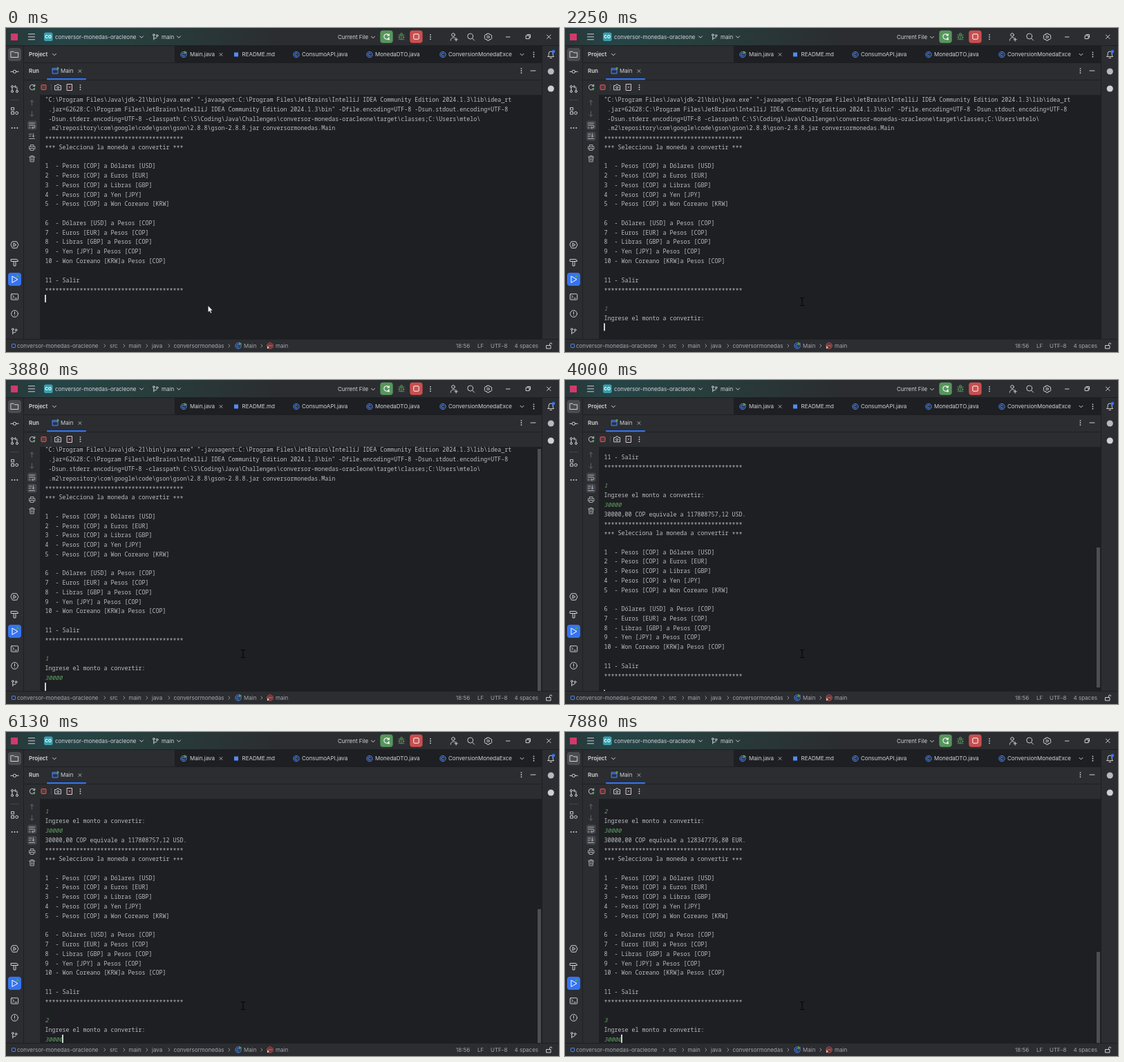
An HTML page for the animation above (8 s loop, 800x470 px).

```html
<!DOCTYPE html>
<html lang="es">
<head>
<meta charset="utf-8">
<title>Conversor de monedas</title>
<style>
  html, body { margin: 0; width: 100%; height: 100%; overflow: hidden; background: #1e1f22; }
  #stage { position: absolute; left: 0; top: 0; width: 800px; height: 470px; overflow: hidden; }
  svg { position: absolute; left: 0; top: 0; }
  svg text { font: 8px Inter, sans-serif; fill: #d3d5da; }
  svg text.bold { font-weight: 600; }
  svg .status text { fill: #a4a7af; }
  .line { fill: none; stroke: #ced0d6; stroke-width: 1; stroke-linecap: round; stroke-linejoin: round; }
  .soft { opacity: .75; }
  .dots { fill: #ced0d6; }
  #console { position: absolute; left: 50px; top: 97px; width: 725px; height: 354px; overflow: hidden; background: #1e1f22; }
  #page { position: absolute; left: 6.6px; top: 0; }
  #text { margin: 0; font: 8.333px/13.763px "Noto Sans Mono", monospace; font-variant-ligatures: none; color: #bcbec4; white-space: pre; }
  #text i { color: #62a566; }
  #text i.dim { color: #6f7d6c; }
  #text b { font-weight: 400; position: relative; top: 1.5px; }
  #caret { position: absolute; left: -.3px; top: .8px; width: 1.3px; height: 11.5px; background: #ced0d6; }
  #thumb { position: absolute; right: 1px; width: 5px; background: #4d4e51; }
</style>
</head>
<body>
<div id="stage">
<svg width="800" height="470" viewBox="0 0 800 470">
  <defs>
    <linearGradient id="glow">
      <stop offset="0" stop-color="#293638"/>
      <stop offset=".16" stop-color="#264447"/>
      <stop offset=".42" stop-color="#27403f"/>
      <stop offset="1" stop-color="#2b2d30"/>
    </linearGradient>
    <path id="down" class="line" d="M-2.5-1.2 0 1.3 2.5-1.2"/>
    <path id="right" class="line" stroke-opacity=".6" d="M-1.2-2.2 1 0-1.2 2.2"/>
    <path id="cross" class="line soft" d="M-2-2 2 2M2-2-2 2"/>
    <g id="dots" class="dots"><circle cy="-3.2" r=".9"/><circle r=".9"/><circle cy="3.2" r=".9"/></g>
    <g id="class">
      <circle r="4.2" fill="#25324d" stroke="#548af7" stroke-width=".9"/>
      <path d="M1.5-1.3A2 2 0 1 0 1.5 1.3" fill="none" stroke="#548af7"/>
    </g>
    <g id="branch" class="line">
      <circle cx="-2.2" cy="-3" r="1.3"/><circle cx="2.6" cy="-2" r="1.3"/>
      <path d="M-2.2-1.6V4M-2.2 2C1 2 2.6 1.5 2.6-.6"/>
    </g>
    <path id="rerun" fill="none" stroke-width="1.1" stroke-linecap="round" d="M3.4-1.6A3.7 3.7 0 1 0 3.6 1M3.7-4V-1.5H1.2"/>
  </defs>

  <!-- panels -->
  <path fill="#2b2d30" d="M0 0H800V25H0ZM0 26H25V451H0ZM26 26H244V50H26ZM26 51H775V97H26ZM26 97H49V451H26ZM776 26H800V451H776ZM0 452H800V470H0Z"/>
  <rect width="400" height="25" fill="url(#glow)"/>

  <!-- title bar -->
  <rect x="7" y="8" width="10" height="10" fill="#d13a6b"/>
  <path class="line" d="M32.5 8.8H41.5M32.5 12.8H41.5M32.5 16.8H41.5"/>
  <rect x="55" y="6.5" width="12.5" height="12.5" rx="2.5" fill="#3a9fae"/>
  <text x="61.2" y="15.3" text-anchor="middle" style="font-size:6.5px;font-weight:700;fill:#fff">CO</text>
  <text x="71" y="16">conversor-monedas-oracleone</text>
  <use href="#down" x="196" y="13"/>
  <use href="#branch" x="216" y="13"/>
  <text x="225" y="16">main</text>
  <use href="#down" x="250" y="13"/>
  <text x="480" y="16">Current File</text>
  <use href="#down" x="531" y="13.5"/>
  <rect x="541.3" y="3.4" width="18.4" height="18.4" rx="4" fill="#57965c"/>
  <use href="#rerun" x="550.5" y="12.5" stroke="#fff"/>
  <circle cx="553.5" cy="16" r="1.5" fill="#fff"/>
  <g class="line" style="stroke:#57965c">
    <rect x="569.4" y="9.8" width="5.2" height="7.2" rx="2.6"/>
    <path d="M570 9.5A2 2 0 0 1 574 9.5M572 11V16M567.8 10 569.4 11.3M576.2 10 574.6 11.3M567.3 13.4H569.4M574.6 13.4H576.7M567.8 17 569.6 15.6M576.2 17 574.4 15.6"/>
  </g>
  <rect x="584.2" y="3.4" width="18.4" height="18.4" rx="4" fill="#c94f4f"/>
  <rect x="589.8" y="8.8" width="7.4" height="7.4" rx="1" fill="none" stroke="#fff"/>
  <use href="#dots" x="614" y="13"/>
  <g class="line">
    <circle cx="647" cy="10" r="2.3"/><path d="M643.3 18C643.3 13 650 13 650.3 15M651.2 14.5V19M649 16.8H653.4"/>
    <circle cx="671.7" cy="12" r="3.9"/><path d="M674.5 15 677.5 18"/>
    <path d="M696 8.2H699L699.8 9.8 701.6 9.6 703 12 702 13 703 14.4 701.6 16.6 699.8 16.2 699 18H696L695.2 16.2 693.4 16.6 692 14.4 693 13 692 12 693.4 9.6 695.2 9.8Z"/><circle cx="697.5" cy="13" r="1.6"/>
    <path d="M723.5 13H729M754 10V9.5H758.5V14H757.5"/><rect x="752.5" y="11" width="4.6" height="4.6"/>
    <path d="M782.5 10 788 15.5M788 10 782.5 15.5"/>
  </g>

  <!-- project header and editor tabs -->
  <text class="bold" x="33" y="41">Project</text>
  <use href="#down" x="70" y="38.5"/>
  <use href="#class" x="257" y="38.5"/>
  <path fill="#57965c" d="M258 33 262.5 35.5 258 38Z"/>
  <text x="266" y="41">Main.java</text>
  <use href="#cross" x="311" y="38.5"/>
  <rect x="330" y="35.5" width="6" height="6" fill="#548af7"/>
  <text x="341.5" y="41">README.md</text>
  <use href="#class" x="420" y="38.5"/><text x="428" y="41">ConsumoAPI.java</text>
  <use href="#class" x="526" y="38.5"/><text x="534" y="41">MonedaDTO.java</text>
  <use href="#class" x="632" y="38.5"/><text x="640" y="41">ConversionMonedaExce</text>
  <use href="#down" x="746.5" y="38.5"/>
  <use href="#dots" x="763.5" y="38.5"/>

  <!-- run header -->
  <text class="bold" x="33" y="65">Run</text>
  <path class="line" style="stroke:#548af7;fill:#25324d" d="M67.5 58.5H75V66H67.5ZM67.5 60.5H75"/>
  <circle cx="75" cy="58.5" r="1.7" fill="#57965c"/>
  <text x="79" y="65">Main</text>
  <use href="#cross" x="107" y="62.5"/>
  <rect x="26" y="75" width="749" height="1" fill="#1e1f22"/>
  <rect x="59" y="73" width="57" height="2.2" rx="1" fill="#3574f0"/>
  <use href="#dots" x="745.5" y="62"/>
  <path class="line" d="M759 62H766"/>
  <use href="#rerun" x="38" y="86" stroke="#aeb1b8"/>
  <circle cx="40.5" cy="88.7" r="1.8" fill="#57965c"/>
  <rect x="51" y="82.5" width="7" height="7" rx="1" fill="#5e3838" stroke="#db5c5c"/>
  <path stroke="#43454a" d="M65.5 81V91"/>
  <g class="line">
    <path d="M71 83.5H73L74 82H76.5L77.5 83.5H79.5V89.8H71Z"/><circle cx="75.2" cy="86.5" r="1.5"/>
    <path d="M88.5 81.5H95.5V90.5H88.5Z"/><path style="stroke:#db5c5c" d="M90.8 84.6 93.2 87.2M93.2 84.6 90.8 87.2"/>
  </g>
  <use href="#dots" x="107.5" y="86"/>

  <!-- console tools -->
  <rect x="31" y="134.5" width="13.5" height="13" rx="3" fill="#43454a"/>
  <rect id="follow" x="31" y="150.5" width="13.5" height="13" rx="3" fill="#43454a"/>
  <path class="line" style="stroke:#5f6269" d="M37.5 112V105M35 107.3 37.5 104.8 40 107.3M37.5 121V128M35 125.8 37.5 128.3 40 125.8"/>
  <g class="line soft">
    <path d="M33.5 138H41.5M33.5 141H40A1.9 1.9 0 0 1 40 144.8H38M39 143.4 37.6 144.8 39 146M33.5 144.8H35"/>
    <path d="M33.5 154H37M33.5 157H36M33.5 160.5H41.5M39.5 153V158M37.8 156.4 39.5 158 41.2 156.4"/>
    <path d="M35.5 172V169.5H40V172M35 175.5H33.5V172H42V175.5H40.5M35.5 174.5H40V177.5H35.5Z"/>
    <path d="M33.7 187H41.6M36 187V185.4H39.3V187M34.5 187 35 194H40.2L40.8 187M36.6 189V192M38.7 189V192"/>
  </g>

  <!-- left strip -->
  <rect x="3" y="29" width="19" height="19" rx="4" fill="#4a4c50"/>
  <rect x="3" y="355" width="19" height="19" rx="4" fill="#3574f0"/>
  <path stroke="#43454a" d="M6 104.5H19"/>
  <g class="line">
    <path d="M7.3 34.3H11L12.5 35.8H17.7V42.5H7.3Z"/>
    <circle cx="12.5" cy="63.3" r="2.2"/><path d="M6.8 63.3H10.2M14.8 63.3H18.2"/>
    <circle cx="9" cy="85" r="1.5"/><circle cx="9" cy="92" r="1.5"/><circle cx="16" cy="92" r="1.5"/>
    <path d="M9 86.6V90.4M16 90.4V87Q16 85 14 85H12.5M13.8 83.3 12.2 85 13.8 86.7"/>
    <rect x="8" y="115.5" width="3.6" height="3.6"/><rect x="8" y="121.5" width="3.6" height="3.6"/><circle cx="15.6" cy="123.3" r="2"/>
    <path d="M9.5 309.8H15.5L18 314.5 15.5 319.2H9.5L7 314.5ZM11.3 312.3 15 314.5 11.3 316.7Z"/>
    <path d="M7.5 335.5H15Q17.5 336 17.5 338.5H7.5ZM11.5 338.5H14V345H11.5Z"/>
    <path style="stroke:#fff" d="M9.3 360.2 17 364.7 9.3 369.2Z"/>
    <rect x="7.3" y="385.8" width="10.4" height="8.4" rx="1"/><path d="M9.5 388 11.5 390 9.5 392M13 392H15.5"/>
    <circle cx="12.5" cy="414.5" r="4.9"/><path d="M12.5 411.8V415M12.5 417.1V417.2"/>
  </g>
  <circle cx="16.5" cy="360" r="1.9" fill="#57965c"/>
  <g class="dots"><circle cx="8.7" cy="145" r="1"/><circle cx="12.5" cy="145" r="1"/><circle cx="16.3" cy="145" r="1"/></g>
  <use href="#branch" x="12" y="440"/>

  <!-- right strip -->
  <path class="line" d="M784 41.5H792.5L791.3 39.5V37A3 3 0 0 0 785.2 37V39.5ZM787 43.5H789.5"/>
  <circle cx="792" cy="34" r="2.3" fill="#3574f0"/>
  <circle cx="788.3" cy="63" r="4.6" fill="#b4b8bf"/>
  <circle cx="788.3" cy="88" r="4.6" fill="#ced0d6"/>

  <!-- status bar -->
  <g class="status">
    <rect x="8.5" y="458.5" width="5" height="5" rx=".7" fill="none" stroke="#548af7"/>
    <text x="16" y="464">conversor-monedas-oracleone</text>
    <text x="150" y="464">src</text>
    <text x="177.5" y="464">main</text>
    <text x="211" y="464">java</text>
    <text x="242.5" y="464">conversormonedas</text>
    <text x="344" y="464">Main</text>
    <text x="390" y="464">main</text>
    <text x="651" y="464">18:56</text>
    <text x="682" y="464">LF</text>
    <text x="701" y="464">UTF-8</text>
    <text x="735.5" y="464">4 spaces</text>
    <use href="#right" x="143" y="461"/><use href="#right" x="171" y="461"/><use href="#right" x="204" y="461"/>
    <use href="#right" x="236" y="461"/><use href="#right" x="323" y="461"/><use href="#right" x="370" y="461"/>
    <use href="#class" x="336" y="461"/>
    <path fill="#57965c" d="M337 455.5 341.5 458 337 460.5Z"/>
    <circle cx="382" cy="461" r="4.2" fill="#402929" stroke="#db5c5c" stroke-width=".9"/>
    <path class="line" style="stroke:#db5c5c" d="M380 462.8V460M382 462.8V460M384 462.8V460M380 460H384"/>
    <path fill="#ced0d6" d="M378 461.5 381 463.5 378 465.5Z"/>
    <path class="line" d="M782 460.5H788V465H782ZM786.5 460.5V458.5A1.6 1.6 0 0 1 789.7 458.5"/>
  </g>
</svg>

<div id="console">
  <div id="page"><pre id="text"></pre><div id="caret"></div></div>
  <div id="thumb"></div>
</div>

<svg width="800" height="470" viewBox="0 0 800 470">
  <path id="arrow" fill="#fff" stroke="#222" stroke-width=".5" d="M292.3 402.8V412.3L294.5 410.4 296 413.7 297.6 413 296.1 409.8H299Z"/>
  <path id="beam" fill="none" stroke="#08080a" stroke-width="1.2" d="M-3.5-5.5H-1Q0-5.5 0-4.5 0-5.5 1-5.5H3.5M0-4.5V4.5M-3.5 5.5H-1Q0 5.5 0 4.5 0 5.5 1 5.5H3.5"/>
</svg>
</div>

<script>
const LOOP = 8000, LINE = 13.763, CHAR = 5, VIEW = 355.3, SCROLL_LAG = 10.4;
const $ = id => document.getElementById(id);

const command = String.raw`"C:\Program Files\Java\jdk-21\bin\java.exe" "-javaagent:C:\Program Files\JetBrains\IntelliJ IDEA Community Edition 2024.1.3\lib\idea_rt
 .jar=62628:C:\Program Files\JetBrains\IntelliJ IDEA Community Edition 2024.1.3\bin" -Dfile.encoding=UTF-8 -Dsun.stdout.encoding=UTF-8
 -Dsun.stderr.encoding=UTF-8 -classpath C:\S\Coding\Java\Challenges\conversor-monedas-oracleone\target\classes;C:\Users\mtelo\
 .m2\repository\com\google\code\gson\gson\2.8.8\gson-2.8.8.jar conversormonedas.Main`.split('\n');

const stars = '*'.repeat(40);
const menu = [
  stars, '*** Selecciona la moneda a convertir ***', '',
  '1  - Pesos [COP] a Dólares [USD]',
  '2  - Pesos [COP] a Euros [EUR]',
  '3  - Pesos [COP] a Libras [GBP]',
  '4  - Pesos [COP] a Yen [JPY]',
  '5  - Pesos [COP] a Won Coreano [KRW]', '',
  '6  - Dólares [USD] a Pesos [COP]',
  '7  - Euros [EUR] a Pesos [COP]',
  '8  - Libras [GBP] a Pesos [COP]',
  '9  - Yen [JPY] a Pesos [COP]',
  '10 - Won Coreano [KRW]a Pesos [COP]', '',
  '11 - Salir', stars, ''
];

// Each round: option typed, prompt shown, digit times, enter pressed, result printed, scroll settled.
const rounds = [
  { pick: '1', typed: 1500, ask: 2000, keys: [3000, 3130, 3250, 3380, 3380], enter: 3880, done: 4000, settled: 4130,
    result: '30000,00 COP equivale a 117808757,12 USD.' },
  { pick: '2', typed: 4630, ask: 5130, keys: [5380, 5500, 5630, 5750, 5750], enter: 6250, done: 6380, settled: 6380,
    result: '30000,00 COP equivale a 128347736,80 EUR.' },
  { pick: '3', typed: 6630, ask: 7130, keys: [7250, 7380, 7630, 7630, 7880], enter: Infinity, done: Infinity }
];

const pointer = [[380, 318, 401], [500, 332, 398], [630, 341, 396], [1000, 343, 397]];

function transcript(t) {
  const lines = [...command, ...menu].map(text => ({ text }));
  for (const r of rounds) {
    lines.push({ text: t >= r.typed ? r.pick : '', input: true, dim: t < r.keys[0] });
    if (t < r.ask) break;
    const digits = r.keys.filter(k => t >= k).length;
    lines.push({ text: 'Ingrese el monto a convertir:' }, { text: '30000'.slice(0, digits), input: true });
    if (t < r.enter) break;
    if (t < r.done) {
      lines.push({ text: '' });
      break;
    }
    lines.push(...[r.result, ...menu].map(text => ({ text })));
  }
  return lines;
}

const markup = ({ text, input, dim }) => input
  ? `<i${dim ? ' class="dim"' : ''}>${text}</i>`
  : text.replace(/\*+/g, '<b>$&</b>');

let shown = '';
function render(t) {
  const lines = transcript(t);
  const html = lines.map(markup).join('\n');
  if (html !== shown) $('text').innerHTML = shown = html;

  // The caret waits one line above the end until the first key is typed.
  const waiting = t < rounds[0].typed;
  const row = lines.length - (waiting ? 2 : 1);
  const caret = $('caret').style;
  caret.transform = `translate(${lines[row].text.length * CHAR}px, ${row * LINE}px)`;
  caret.visibility = waiting && t >= 1250 ? 'hidden' : 'visible';

  const total = lines.length * LINE;
  const lagging = rounds.some(r => t >= r.done && t < r.settled);
  const scroll = Math.max(0, total - VIEW - (lagging ? SCROLL_LAG : 0));
  $('page').style.top = -scroll + 'px';
  const thumb = $('thumb').style;
  thumb.display = total > VIEW ? 'block' : 'none';
  thumb.top = scroll / total * VIEW + 'px';
  thumb.height = VIEW / total * VIEW + 'px';

  $('follow').style.visibility = t >= rounds[0].ask ? 'visible' : 'hidden';

  const place = pointer.filter(p => t >= p[0]).pop();
  $('arrow').style.visibility = place ? 'hidden' : 'visible';
  $('beam').style.visibility = place ? 'visible' : 'hidden';
  if (place) $('beam').setAttribute('transform', `translate(${place[1]} ${place[2]})`);
}

const start = performance.now();
function tick() {
  render((performance.now() - start) % LOOP);
  requestAnimationFrame(tick);
}
tick();
</script>
</body>
</html>
```
